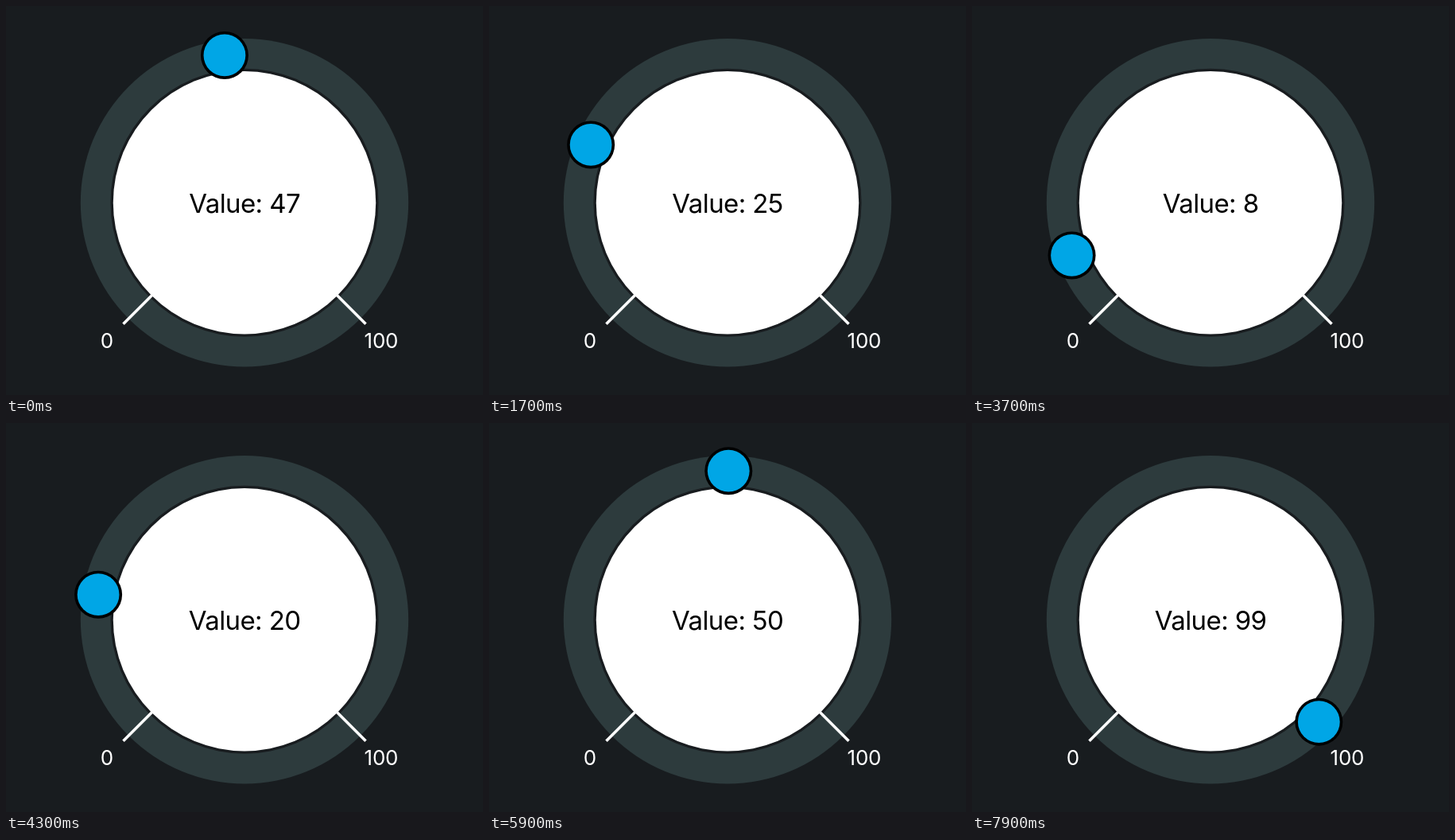
These frames come from a looping animation (600x489 px, 8000 ms). An HTML page with a canvas:

```html
<!DOCTYPE html>
<html lang="en">
<head>
<meta charset="utf-8">
<title>Circular slider</title>
<style>
  html, body { margin: 0; width: 100%; height: 100%; overflow: hidden; background: #181c1f; }
  canvas { display: block; }
</style>
</head>
<body>
<canvas id="stage" width="600" height="489"></canvas>
<script>
const ctx = document.getElementById('stage').getContext('2d');
const LOOP = 8000, STEP = 100;
const CX = 300, CY = 247.2, ORBIT = 187;
const BG = '#181c1f';

// [time in ms, slider value]
const KEYS = [
  [0, 47.1], [500, 47.1], [1400, 32.3], [1700, 25.15], [2300, 15.6],
  [2900, 6.9], [3200, 3.9], [3400, 3.1], [4100, 19.4], [4300, 20.26],
  [5000, 29.7], [5900, 50.1], [6800, 76.1], [7700, 97], [7900, 99.4]
];

const slope = i => (KEYS[i + 1][1] - KEYS[i][1]) / (KEYS[i + 1][0] - KEYS[i][0]);

// Harmonic mean of neighbouring slopes keeps the curve monotone.
function tangent(i) {
  if (i === 0) return 0;
  if (i === KEYS.length - 1) return slope(i - 1);
  const a = slope(i - 1), b = slope(i);
  return a * b <= 0 ? 0 : 2 * a * b / (a + b);
}

function valueAt(t) {
  const last = KEYS.length - 1;
  if (t >= KEYS[last][0]) return KEYS[last][1];
  let i = 0;
  while (t >= KEYS[i + 1][0]) i++;
  const [t0, v0] = KEYS[i], [t1, v1] = KEYS[i + 1];
  const d = t1 - t0, u = (t - t0) / d, w = 1 - u;
  return v0 * w * w * (1 + 2 * u) + v1 * u * u * (3 - 2 * u)
    + d * u * w * (tangent(i) * w - tangent(i + 1) * u);
}

function disc(x, y, r, color) {
  ctx.fillStyle = color;
  ctx.beginPath();
  ctx.arc(x, y, r, 0, Math.PI * 2);
  ctx.fill();
}

function tick(side) {
  ctx.strokeStyle = '#fff';
  ctx.lineWidth = 3.6;
  ctx.beginPath();
  ctx.moveTo(CX + side * 116.5, 363.7);
  ctx.lineTo(CX + side * 152.5, 399.7);
  ctx.stroke();
}

function label(text, x, y, size, color, spacing) {
  ctx.font = `${size}px Inter, Roboto, sans-serif`;
  ctx.letterSpacing = spacing + 'px';
  ctx.textAlign = 'center';
  ctx.textBaseline = 'alphabetic';
  ctx.fillStyle = color;
  ctx.fillText(text, x + spacing / 2, y);
}

function draw(t) {
  const value = valueAt(t);
  const angle = (value - 50) * 2.7 * Math.PI / 180;
  const x = CX + 0.4 + ORBIT * Math.sin(angle);
  const y = CY - ORBIT * Math.cos(angle);

  ctx.fillStyle = BG;
  ctx.fillRect(0, 0, 600, 489);
  disc(CX, CY, 206.2, '#2d3b3d');
  disc(CX, CY, 168.5, BG);
  disc(CX, CY, 165.2, '#fff');
  tick(-1);
  tick(1);
  label('0', 127, 429.5, 26, '#fff', -0.3);
  label('100', 472, 429.5, 26, '#fff', -0.3);
  label('Value: ' + Math.floor(value), CX + 0.4, 260, 33, '#000', -0.6);
  disc(x, y, 30, '#000');
  disc(x, y, 26.4, '#00a6e6');
}

const start = performance.now();
function frame() {
  const t = (performance.now() - start) % LOOP;
  draw(Math.floor(t / STEP) * STEP);
  requestAnimationFrame(frame);
}
frame();
</script>
</body>
</html>
```
